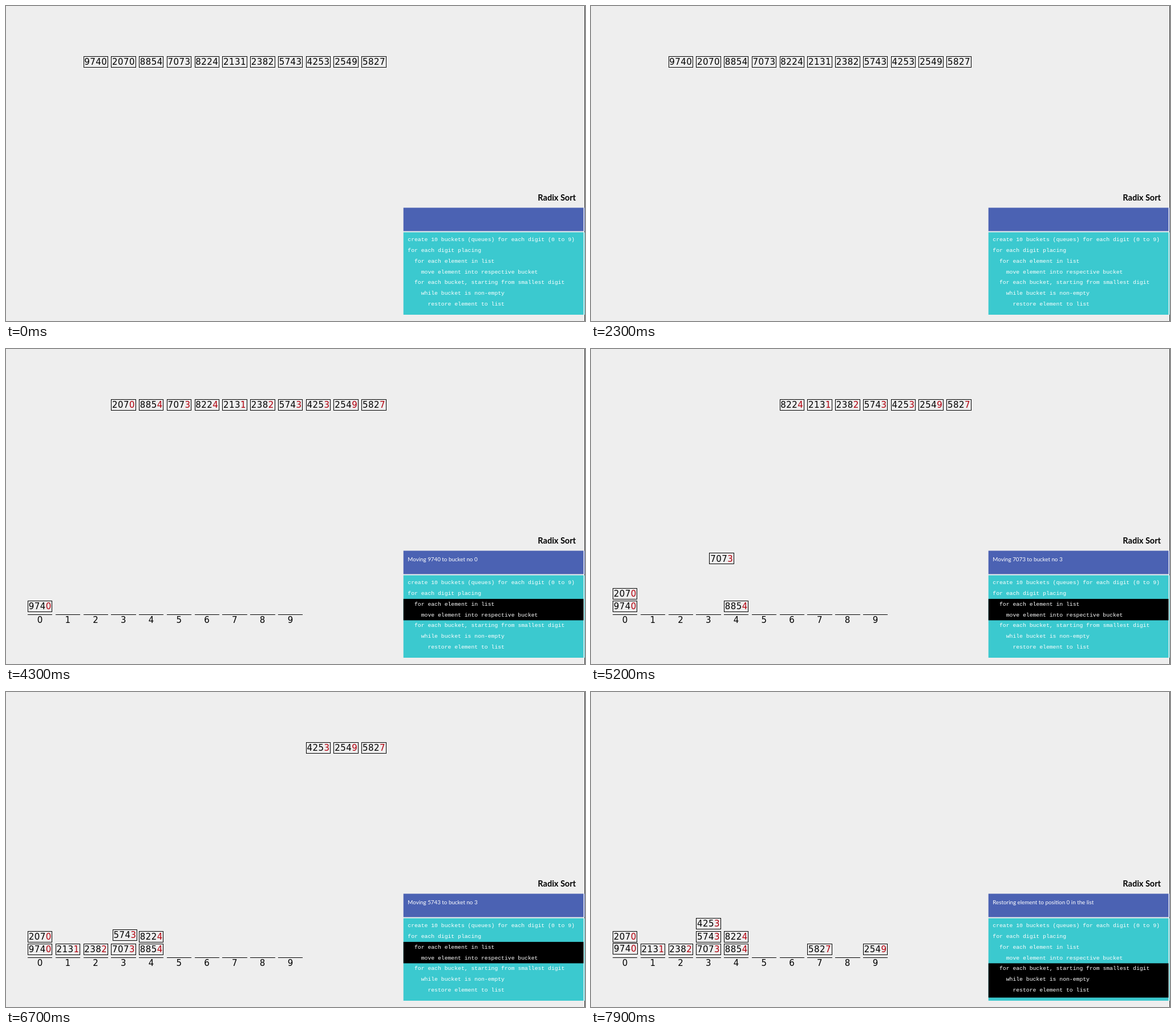
Animation, 1015 px wide and 552 px high, one loop 8 s. Source, as an HTML page:

```html
<!DOCTYPE html>
<html lang="en">
<head>
<meta charset="utf-8">
<title>Radix Sort</title>
<style>
  html, body { margin: 0; width: 100%; height: 100%; overflow: hidden; background: #eee; }
  svg { display: block; width: 1015px; height: 552px; }
  .num { font: 15px "DejaVu Sans", sans-serif; letter-spacing: .45px; text-anchor: middle; }
  .red { fill: #b1000e; }
  .box, .base { fill: none; stroke: #000; shape-rendering: crispEdges; }
  .title { font: bold 14.5px Lato, sans-serif; text-anchor: end; }
  .status { font: 9.8px Lato, sans-serif; fill: #fff; }
  .code { font: 9.75px "Liberation Mono", monospace; fill: #fff; }
</style>
</head>
<body>
<svg id="stage" viewBox="0 0 1015 552"></svg>
<script>
const LOOP = 8000, TICK = 100;
const READY = 3650, START = 3955.4, PERIOD = 356.3, MOVE = 288;
const PITCH = 48.77, LEFT = 38.5, LIST_Y = 88.5;
const BUCKET_Y = 441.75, STACK = 22.5;
const BOX_W = 42.4, BOX_H = 18.75;
const LINE_Y = 400.4, LINE_H = 18.75;
const PANEL_X = 696.7, PANEL_W = 315.7;

const values = [9740, 2070, 8854, 7073, 8224, 2131, 2382, 5743, 4253, 2549, 5827];
const code = [
  [0, 'create 10 buckets (queues) for each digit (0 to 9)'],
  [0, 'for each digit placing'],
  [1, 'for each element in list'],
  [2, 'move element into respective bucket'],
  [1, 'for each bucket, starting from smallest digit'],
  [2, 'while bucket is non-empty'],
  [3, 'restore element to list']
];

const stage = document.getElementById('stage');
const column = i => LEFT + i * PITCH;

function add(parent, tag, attrs, text = '') {
  const el = document.createElementNS('http://www.w3.org/2000/svg', tag);
  for (const key in attrs) el.setAttribute(key, attrs[key]);
  el.textContent = text;
  return parent.appendChild(el);
}

function rect(x, y, width, height, fill) {
  return add(stage, 'rect', { x, y, width, height, fill });
}

// Side panel, with a tab at the stage edge
function panel(y, height, fill) {
  rect(PANEL_X, y, PANEL_W, height, fill);
  rect(1014, y, 1, height, fill);
}

rect(1014, 0, 1, 552, '#333');
panel(353.5, 41, '#4b62b3');
panel(396.5, 144.5, '#3bc9cf');
const highlight = rect(PANEL_X, 0, PANEL_W, 0, '#000');
add(stage, 'text', { class: 'title', x: 999, y: 341 }, 'Radix Sort');
const status = add(stage, 'text', { class: 'status', x: 704.3, y: 372 });
code.forEach(([depth, text], i) => {
  add(stage, 'text', { class: 'code', x: 704.3 + depth * 11.7, y: 412.3 + i * LINE_H }, text);
});

// Buckets
const buckets = add(stage, 'g', {});
for (let d = 0; d < 10; d++) {
  const x = column(d);
  add(buckets, 'path', { class: 'base', d: `M${x - .5} 465.5h${BOX_W + 1}` });
  add(buckets, 'text', { class: 'num', x: x + BOX_W / 2, y: 480 }, d);
}

// Numbers, each with its place in the list and in its bucket
const counts = Array(10).fill(0);
const items = values.map((value, i) => {
  const digit = value % 10;
  const group = add(stage, 'g', {});
  add(group, 'rect', { class: 'box', width: BOX_W, height: BOX_H });
  const label = add(group, 'text', { class: 'num', x: BOX_W / 2, y: 14.6 });
  add(label, 'tspan', {}, Math.floor(value / 10));
  return {
    value, digit, group,
    last: add(label, 'tspan', {}, digit),
    from: [column(i + 2), LIST_Y],
    to: [column(digit), BUCKET_Y - STACK * counts[digit]++]
  };
});

const ease = p => p < .5 ? 4 * p ** 3 : 1 - 4 * (1 - p) ** 3;

function progress(t, step) {
  const p = (t - START - step * PERIOD) / MOVE;
  return ease(Math.min(1, Math.max(0, p)));
}

function mark(first, last) {
  const top = LINE_Y + first * LINE_H;
  const bottom = last === code.length - 1 ? 535.5 : LINE_Y + (last + 1) * LINE_H;
  highlight.setAttribute('y', top);
  highlight.setAttribute('height', bottom - top);
}

function draw(t) {
  const ready = t >= READY;
  const step = Math.floor((t - START) / PERIOD);
  const restoring = step >= items.length;

  buckets.setAttribute('visibility', ready ? 'visible' : 'hidden');
  highlight.setAttribute('visibility', ready ? 'visible' : 'hidden');
  if (restoring) mark(4, 6);
  else if (step >= 0) mark(2, 3);
  else mark(0, 1);

  status.textContent = restoring ? 'Restoring element to position 0 in the list'
    : step >= 0 ? `Moving ${items[step].value} to bucket no ${items[step].digit}` : '';

  items.forEach(({ group, last, from, to }, i) => {
    let p = progress(t, i);
    if (i === 0) p -= progress(t, items.length);
    const [x, y] = from.map((a, k) => a + (to[k] - a) * p);
    group.setAttribute('transform', `translate(${x} ${y})`);
    last.setAttribute('class', ready ? 'red' : '');
  });
}

const begin = performance.now();
function frame() {
  const t = (performance.now() - begin) % LOOP;
  draw(Math.floor(t / TICK) * TICK);
  requestAnimationFrame(frame);
}
frame();
</script>
</body>
</html>
```
